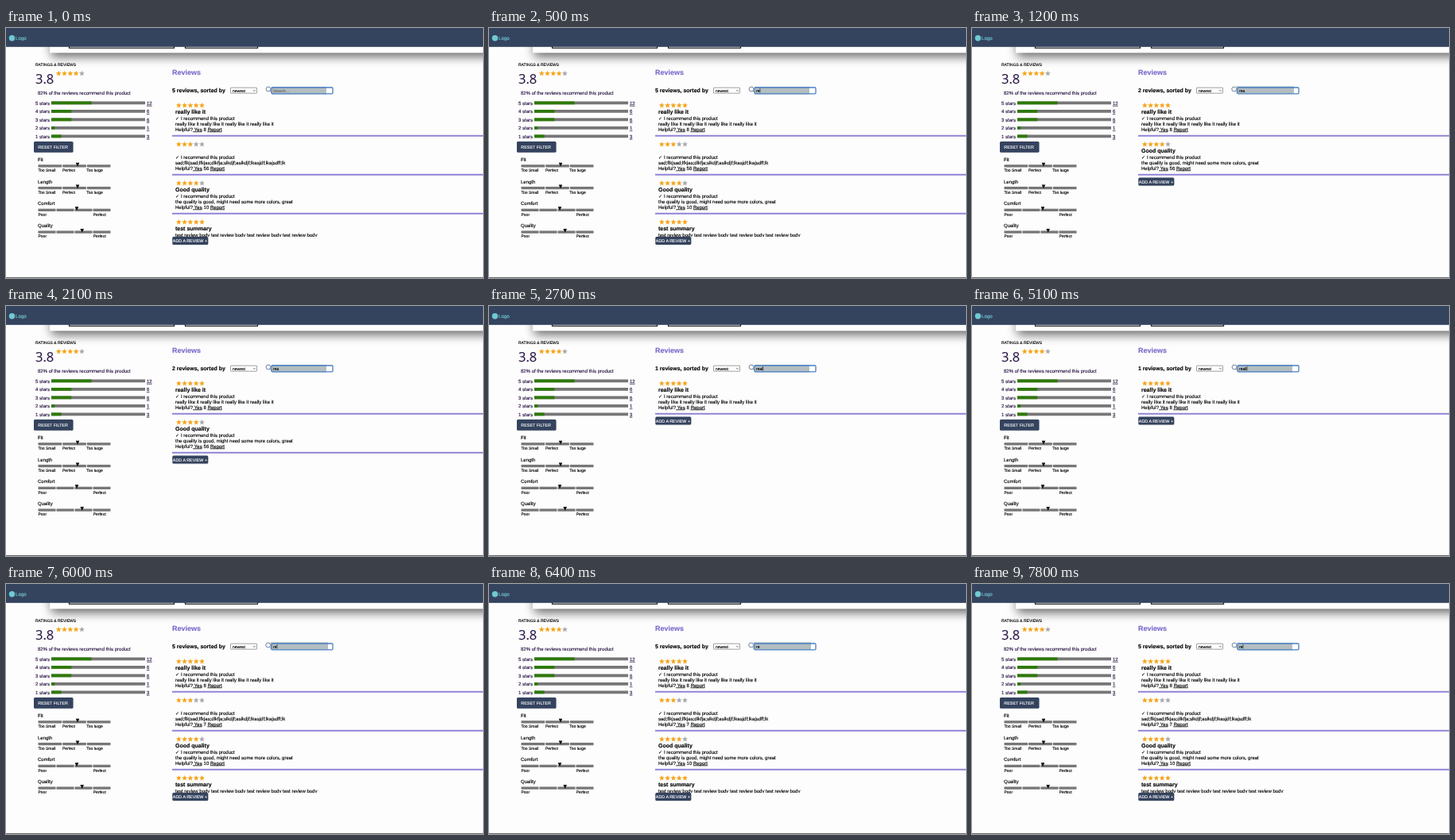
Animation, 600 px wide and 315 px high, one loop 7900 ms. Source, as an HTML page:

```html
<!DOCTYPE html>
<html lang="en">
<head>
<meta charset="utf-8">
<title>Review search</title>
<style>
html, body { margin: 0; width: 100%; height: 100%; overflow: hidden; background: #fdfdfd; }
svg { display: block; width: 600px; height: 315px; }
text {
  font: 6px "Liberation Sans", Arial, sans-serif;
  white-space: pre;
  text-rendering: geometricPrecision;
  stroke-width: .14px;
}
.u { text-decoration: underline; }
</style>
</head>
<body>
<svg viewBox="0 0 600 315">
  <defs>
    <filter id="soft" x="-10%" y="-120%" width="120%" height="340%"><feGaussianBlur stdDeviation="6.5"/></filter>
    <clipPath id="listBox"><rect x="200" y="86" width="400" height="177"/></clipPath>
  </defs>
  <g id="page"></g>
  <g id="search"></g>
  <g id="list" clip-path="url(#listBox)"></g>
  <g id="add"></g>
</svg>
<script>
const LOOP = 7900, SLATE = '#34435e', GREY = '#777', INK = '#2b1745';
const $ = id => document.getElementById(id);

const rect = (x, y, w, h, fill, extra = '') =>
  `<rect x="${x}" y="${y}" width="${w}" height="${h}" fill="${fill}" ${extra}/>`;

const text = (x, y, s, { size = 6, fill = '#000', bold, cls = '', font } = {}) =>
  `<text x="${x}" y="${y}" fill="${fill}" stroke="${fill}" class="${cls}" style="font-size:${size}px` +
  `${bold ? ';font-weight:bold' : ''}${font ? ';font-family:' + font : ''}">${s}</text>`;

function star(cx, cy, fill) {
  const pts = Array.from({ length: 10 }, (_, i) => {
    const r = i % 2 ? 1.65 : 3.6, a = i * Math.PI / 5;
    return `${(cx + r * Math.sin(a)).toFixed(2)},${(cy - r * Math.cos(a)).toFixed(2)}`;
  });
  return `<polygon points="${pts.join(' ')}" fill="${fill}"/>`;
}

const stars = (x, y, n) =>
  [0, 1, 2, 3, 4].map(i => star(x + i * 7.3, y, i < n ? '#f5a51d' : '#a9a9b0')).join('');

const button = (x, y, w, h, label, tx) =>
  rect(x, y + 0.6, w, h, '#0003', 'rx="1.8"') + rect(x, y, w, h, SLATE, 'rx="1.5"') +
  text(tx, y + h / 2 + 1.9, label, { size: 5.4, fill: '#fff' });

function slider(i, name, labels, parts, pointer) {
  const y = 172.2 + i * 27.75, w = 92 / parts;
  let s = text(40, y - 4.4, name);
  for (let k = 0; k < parts; k++) s += rect(40.5 + k * w, y, w - 1, 3.3, GREY);
  s += `<path d="M${pointer - 2.3} ${y - 2.5}h4.6l-2.3 4.8z"/>`;
  for (const [x, label] of labels) s += text(x, y + 8.8, label, { size: 5 });
  return s;
}

function page() {
  const outline = 'stroke="#111" stroke-width="1.2"';
  let s = rect(57, 14, 560, 22, '#000', 'opacity=".6" filter="url(#soft)"') +
    rect(55, 0, 545, 31.3, '#fff') +
    rect(79.5, 10, 132, 15.2, '#fff', outline) + rect(225.5, 10, 91, 15.2, '#fff', outline) +
    rect(0, 0, 600, 23.8, SLATE) + rect(0, 314, 600, 1, '#666') +
    '<circle cx="7.5" cy="12.7" r="3.7" fill="#6fc9d2"/>' +
    text(12, 15, 'Logo', { size: 6.2, fill: '#6fc9d2' });

  s += text(37, 47.8, 'RATINGS &amp; REVIEWS', { size: 5 }) +
    text(37, 69.7, '3.8', { size: 16.5, fill: INK, font: "'Open Sans',sans-serif" }) +
    stars(66.2, 57.3, 4) +
    text(40, 83.8, '82% of the reviews recommend this product', { fill: INK });
  [12, 6, 6, 1, 3].forEach((n, i) => {
    const y = 92.5 + i * 10.5;
    s += text(37, y + 4.4, `${5 - i} stars`, { fill: INK }) + rect(57, y, 118, 3.8, GREY) +
      rect(57, y, 118 * n / 28, 3.8, '#2c7a05') +
      text(177, y + 4.4, n, { fill: INK, cls: 'u' });
  });
  s += button(35, 142.9, 49.5, 13.8, 'RESET FILTER', 40.3);

  const sizes = [[40.5, 'Too Small'], [71, 'Perfect'], [101.3, 'Too large']];
  const grades = [[40.5, 'Poor'], [109.7, 'Perfect']];
  s += slider(0, 'Fit', sizes, 3, 90) + slider(1, 'Length', sizes, 3, 90) +
    slider(2, 'Comfort', grades, 4, 89) + slider(3, 'Quality', grades, 4, 95.7);

  return s + text(209, 58.5, 'Reviews', { size: 9, bold: true, fill: '#7c6bcb' }) +
    rect(282.5, 75.2, 33, 7, '#fff', 'stroke="#777" stroke-width=".7" rx=".6"') +
    text(285, 80.5, 'newest', { size: 5 }) +
    '<path d="M310.8 77.9l1.5 1.6 1.5-1.6" fill="none" stroke="#333" stroke-width=".6"/>';
}

const reviews = [
  { n: 5, title: 'really like it', body: Array(4).fill('really like it').join(' ') },
  { n: 3, title: '', body: 'sad;flkjsad;lfkjas;dlkfja;slkdjf;aslkdjf;lkasjdf;lkajsdff;lk' },
  { n: 4, title: 'Good quality', body: 'the quality is good, might need some more colors, great' },
  { n: 5, title: 'test summary', body: Array(4).fill('test review body').join(' '), plain: true }
];
const visible = { 5: [0, 1, 2, 3], 2: [0, 2], 1: [0] };

function review(r, i, votes) {
  const y = 97.6 + i * 49;
  let s = stars(217.3, y, r.n) + text(213, y + 10.8, r.title, { size: 7, bold: true });
  if (r.plain) return s + text(213, y + 18.2, r.body);
  const after = 250.3 + String(votes).length * 3.34;
  return s + text(213, y + 18.2, '✓', { font: "'DejaVu Sans',sans-serif" }) +
    text(220, y + 18.2, 'I recommend this product') + text(213, y + 25.1, r.body) +
    text(213, y + 31.9, 'Helpful?') + text(235.3, y + 31.9, ' Yes', { cls: 'u' }) +
    text(248.6, y + 31.9, votes) + text(after, y + 31.9, 'Report', { cls: 'u' }) +
    rect(209, y + 37.2, 391, 2, '#9187d8');
}

function drawList(count, votes) {
  $('list').innerHTML = visible[count].map((id, i) => review(reviews[id], i, votes[i])).join('');
  const top = count === 5 ? 263 : 139.6 + (count - 1) * 49;
  $('add').innerHTML = button(209.3, top, 45, 10, 'ADD A REVIEW +', 209.8) +
    text(209, 81, `${count} reviews, sorted by`, { size: 7, bold: true });
}

// [time, typed text]
const keys = [[0, ''], [200, 'r'], [400, 're'], [600, 'rea'], [2300, 'real'], [2800, 'reall'],
  [3300, 'really'], [4900, 'reall'], [5400, 'real'], [5700, 'rea'], [5800, 're']];
const hits = s => s.length < 3 ? 5 : s === 'rea' ? 2 : 1;

// The field's grey overlay grows and shrinks, resting at both ends.
const swell = t => Math.min(1, Math.max(0, 0.5 - 1.6 * Math.cos(t / 2600 * 2 * Math.PI)));

const pen = document.createElement('canvas').getContext('2d');
pen.font = '5px "Liberation Sans", Arial, sans-serif';

function drawSearch(t, time, typed) {
  const k = swell(t), x = 334 - 1.5 * k;
  const caretX = 336.2 + pen.measureText(typed).width;
  const caretOn = typed && (t - time) % 1000 < 500;
  $('search').innerHTML =
    `<g fill="none" stroke="#4f6683" stroke-width=".8"><circle cx="${330 - k * 0.3}" cy="77" r="2.9"/>` +
    '<path d="M332 79.2l2 2.2"/></g>' +
    rect(334, 75, 77, 7.8, '#fff', 'rx="1"') +
    rect(x, 74 - k * 0.6, 69 + 3.5 * k, 9.4, '#b3bec1') +
    rect(334, 75, 77, 7.8, 'none', 'rx="1" stroke="#4a7fc4" stroke-width="1.3"') +
    text(336, 80.6, typed || 'Search...', { size: 5, fill: typed ? '#000' : '#666' }) +
    (caretOn ? rect(caretX, 76.2, 0.6, 5.2, '#000') : '');
}

const start = performance.now();
let shown = '';

function frame() {
  const t = Math.floor((performance.now() - start) % LOOP / 100) * 100;
  const [time, typed] = keys.filter(k => k[0] <= t).pop();
  const votes = t < 5200 ? [8, 56, 10] : [8, 7, 10];
  const state = hits(typed) + ':' + votes;
  if (state !== shown) {
    drawList(hits(typed), votes);
    shown = state;
  }
  drawSearch(t, time, typed);
  requestAnimationFrame(frame);
}

$('page').innerHTML = page();
frame();
</script>
</body>
</html>
```
